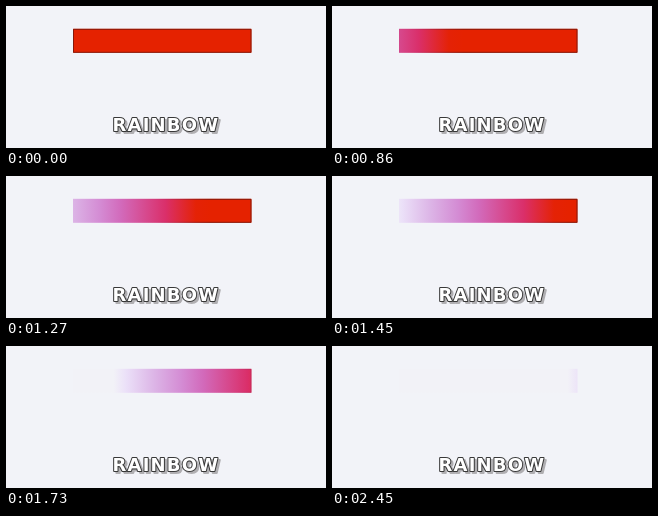
An HTML page with a canvas that plays this animation: 320x142 px, repeating every 3490 ms.

```html
<!DOCTYPE html>
<html lang="en">
<head>
<meta charset="utf-8">
<title>Rainbow</title>
<style>
  html, body { margin: 0; width: 100%; height: 100%; overflow: hidden; background: #f2f3f8; }
  canvas { display: block; width: 100vw; height: 100vh; }
</style>
</head>
<body>
<canvas id="stage" width="320" height="142"></canvas>
<script>
const ctx = document.getElementById('stage').getContext('2d');
const LOOP = 3490, START = 500, HOLD = 2450;
const SPEED = 0.178;
const BAR = { x: 67, y: 22.8, w: 178.5, h: 24 };

// Offsets measured backwards from the leading edge of the fade.
const FILL = [
  [0, '#e52200'], [0.08, '#e42206'], [0.25, '#da2f6a'],
  [0.5, '#d26abb'], [0.62, '#d48cd4'], [0.77, '#dcb4e6'],
  [0.93, '#ebe0f8'], [1, '#f2f2f7']
];
const EDGE = [
  [0, 'rgba(110,20,10,.8)'], [0.1, 'rgba(120,20,30,.6)'],
  [0.3, 'rgba(140,30,90,.1)'], [0.5, 'rgba(180,90,170,0)']
];

function sweep(front, stops) {
  const g = ctx.createLinearGradient(front, 0, front - BAR.w, 0);
  for (const [at, color] of stops) g.addColorStop(at, color);
  return g;
}

function drawBar(t) {
  const front = BAR.x + SPEED * (Math.min(t, HOLD) - START);
  ctx.fillStyle = sweep(front, FILL);
  ctx.fillRect(BAR.x, BAR.y, BAR.w, BAR.h);
  ctx.strokeStyle = sweep(front, EDGE);
  ctx.lineWidth = 1;
  ctx.strokeRect(BAR.x + 0.5, BAR.y + 0.5, BAR.w - 1, BAR.h - 1);
}

function drawLabel() {
  const word = 'RAINBOW', x = 106.5, y = 125;
  ctx.font = 'bold 18px "DejaVu Sans", sans-serif';
  ctx.letterSpacing = '1.2px';
  ctx.lineJoin = 'round';
  ctx.lineWidth = 2;
  ctx.strokeStyle = ctx.fillStyle = '#b0afb2';
  ctx.strokeText(word, x + 2.2, y + 2.2);
  ctx.fillText(word, x + 2.2, y + 2.2);
  ctx.strokeStyle = '#383838';
  ctx.strokeText(word, x, y);
  ctx.fillStyle = '#fff';
  ctx.fillText(word, x, y);
}

function frame() {
  ctx.fillStyle = '#f2f3f8';
  ctx.fillRect(0, 0, 320, 142);
  drawBar(performance.now() % LOOP);
  drawLabel();
  requestAnimationFrame(frame);
}
frame();
</script>
</body>
</html>
```
